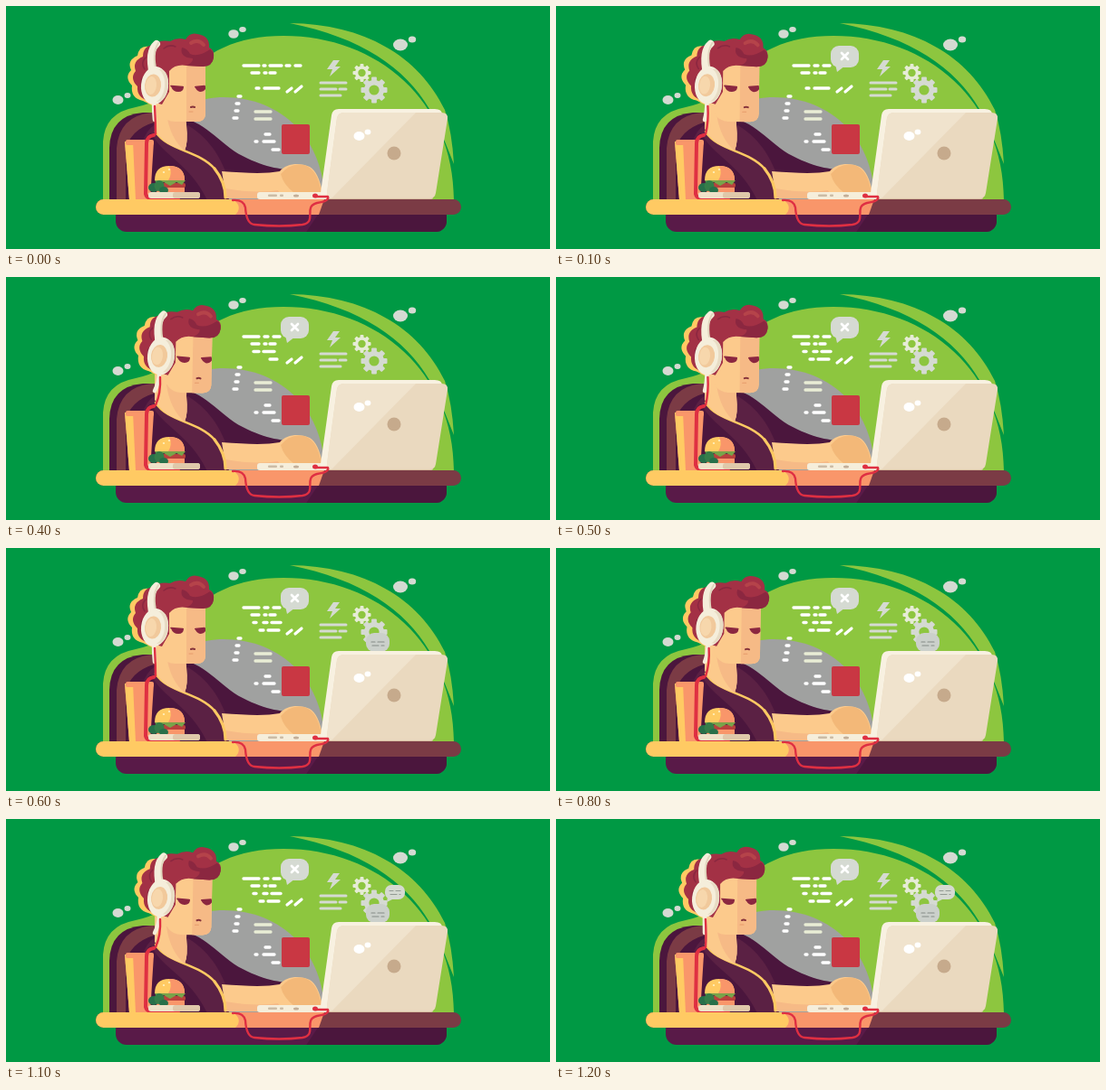
An HTML page with a canvas for the animation above (1.3 s loop, 600x269 px).

```html
<!DOCTYPE html>
<html lang="en">
<head>
<meta charset="utf-8">
<title>Coder at a desk</title>
<style>
html, body { margin: 0; width: 100%; height: 100%; overflow: hidden; background: #009944; }
canvas { display: block; width: 600px; height: 269px; }
</style>
</head>
<body>
<canvas id="stage"></canvas>
<script>
const W = 600, H = 269, LOOP = 1300, STEP = 100;
const canvas = document.getElementById('stage');
const ctx = canvas.getContext('2d');
const ratio = window.devicePixelRatio || 1;
canvas.width = W * ratio;
canvas.height = H * ratio;

const C = {
  bg: '#009944', lime: '#8dc63f', gray: '#a0a1a0', pale: '#d5dad2',
  plum: '#4b163d', shirt: '#5b2144', brown: '#7b3b45',
  hair: '#a33145', hairDark: '#8b2740', hairLight: '#b5434a',
  skin: '#fcca8c', skinShade: '#f6ba86', gold: '#ffca63', salmon: '#f9966a',
  cream: '#f5eedb', beige: '#ead9bf', red: '#df2f42', white: '#ffffff'
};

function shape(d, fill) {
  ctx.fillStyle = fill;
  ctx.fill(new Path2D(d));
}

function stroke(d, color, width) {
  ctx.strokeStyle = color;
  ctx.lineWidth = width;
  ctx.lineCap = ctx.lineJoin = 'round';
  ctx.stroke(new Path2D(d));
}

function oval(x, y, rx, ry, fill, turn = 0) {
  ctx.fillStyle = fill;
  ctx.beginPath();
  ctx.ellipse(x, y, rx, ry, turn, 0, Math.PI * 2);
  ctx.fill();
}

function box(x, y, w, h, r, fill) {
  ctx.fillStyle = fill;
  ctx.beginPath();
  ctx.roundRect(x, y, w, h, r);
  ctx.fill();
}

// Rounded bar with further shapes painted inside it
function bar(x, y, w, h, r, fill, paint) {
  ctx.save();
  box(x, y, w, h, r, fill);
  ctx.clip();
  paint();
  ctx.restore();
}

// Horizontal dashes given as [start, end] pairs
function dashes(y, spans, color = C.white, width = 3.3) {
  for (const [a, b] of spans) stroke(`M${a} ${y}H${b}`, color, width);
}

function gear(x, y, r, hole, color) {
  ctx.save();
  ctx.translate(x, y);
  for (let i = 0; i < 8; i++) {
    ctx.rotate(Math.PI / 4);
    box(-r * 0.2, -r, r * 0.4, r * 0.5, 1, color);
  }
  ctx.beginPath();
  ctx.arc(0, 0, (r * 0.76 + hole) / 2, 0, Math.PI * 2);
  ctx.strokeStyle = color;
  ctx.lineWidth = r * 0.76 - hole;
  ctx.stroke();
  ctx.restore();
}

function backdrop() {
  ctx.fillStyle = C.bg;
  ctx.fillRect(0, 0, W, H);
  shape('M107 215L107 150Q109 118 143 112Q175 105 190 85C220 50 255 33 306 33C410 33 494 105 494 215Z', C.lime);
  shape('M313 19C395 20 455 55 484 115Q492 140 494 175L480 140L467 114C440 68 392 35 313 19Z', C.lime);
  shape('M150 215C150 140 190 101 240 101C305 101 351 149 351 215Z', C.gray);

  oval(251, 31, 5.7, 4.8, C.pale);
  oval(261, 26, 3.8, 3, C.pale);
  oval(435, 43, 8, 6.5, C.pale);
  oval(448, 37, 4.2, 3.5, C.pale);
  oval(123.5, 104, 6, 5, C.pale);
  oval(134, 99, 3.5, 3, C.pale);

  shape('M361 60L368 60L363 67H369L357 78L360 70H354Z', C.pale);
  dashes(85, [[347, 375]], C.pale, 3);
  dashes(92, [[347, 364], [368, 375]], C.pale, 3);
  dashes(99, [[347, 369]], C.pale, 3);
  gear(392.5, 74, 10, 4.2, '#e6ecd6');
  gear(406, 93, 14.5, 5.6, C.pale);
}

function codeLines(k) {
  dashes(66, k < 1 ? [[262, 279], [284, 286], [291, 304], [309, 313], [319, 325]]
                   : [[262, 279], [285, 289], [295, 302]]);
  dashes(74, [[271, 279], [285, 287], [291, 297]]);
  if (k > 2) dashes(82.5, k < 5 ? [[273, 279], [284, 296]] : [[273, 276], [284, 288], [293, 303]]);
  if (k < 3) dashes(91, [[276, 279], [285, 301]]);
  else dashes(91, k < 5 ? [[291, 299]] : [[280, 284], [289, 301]]);
  stroke('M310 95L315 91M319 95L326 89', C.white, 3.2);

  dashes(100, [[256, 259]]);
  dashes(108, [[254, 257]]);
  dashes(116, [[253, 256]]);
  dashes(124, [[251, 255]]);
  dashes(117, [[275, 292]], '#e9edd5');
  dashes(125, [[275, 292]], '#e9edd5');
  dashes(142, [[286, 291]]);
  dashes(150, [[275, 277], [284, 296]]);
  dashes(159, [[294, 301]]);
  box(304, 131, 31, 33, 2, '#c93743');
}

function bubbles(k) {
  if (k >= 1) {
    box(303, 44, 31, 24, 9, C.pale);
    shape('M308 64L310 73L319 66Z', C.pale);
    stroke('M315 52L322 59M322 52L315 59', C.white, 2.7);
  }
  if (k >= 6) {
    box(397, 94, 26, 21, 9, '#cbd0cb');
    shape('M402 112L406 118L413 113Z', '#cbd0cb');
    dashes(104, [[403, 407], [410, 417]], '#858c88', 1.2);
    dashes(108, [[404, 411], [414, 417]], '#858c88', 1.2);
  }
  if (k >= 10) {
    box(418, 73, 22, 16, 7, C.pale);
    shape('M421 86L420 92L428 88Z', C.pale);
    dashes(79.5, [[423, 427], [430, 435]], '#929a93', 1.1);
    dashes(83.5, [[424, 431], [434, 435]], '#929a93', 1.1);
  }
}

function body() {
  shape('M114 215L114 157Q115 121 151 118H176V215Z', C.plum);
  shape('M122 215V157Q125 122 160 118H180V215Z', C.brown);
  shape('M132 215V163Q134 137 166 128H180V215Z', C.plum);
  // Far sleeve, then the near side of the shirt
  shape('M186 124C216 122 234 152 261 166C288 180 305 181 325 182L300 205H214Z', C.plum);
  shape('M150 215V154Q153 138 166 130L197 130C221 143 234 163 242 183L246 215Z', C.shirt);
  shape('M151 158Q151 145 160 140C172 166 202 173 222 215H151Z', C.plum);
  stroke('M165 139C178 160 213 160 230 180', C.gold, 2.5);
}

function neck(dx) {
  const right = 197 + dx * 0.5;
  shape(`M164 101H${right}L199 132Q201 152 197 160Q173 154 164 136Z`, C.skin);
  shape(`M177 119L${right} 121L199 132Q201 152 197 160Q181 147 177 119Z`, C.skinShade);
}

function arm() {
  shape('M238 183C265 185 286 186 302 183C309 174 324 173 335 178Q345 184 349 207H242Z', C.skin);
  shape('M303 186Q313 173 329 176Q344 181 348 207H318Q306 198 303 186Z', '#f3b878');
  shape('M242 202Q275 208 300 204L305 213H243Z', C.skinShade);
  stroke('M230 180Q242 195 242 212', C.gold, 3.2);
}

function snack() {
  shape('M131 150H163L159 215H136Z', C.salmon);
  shape('M131 150H140L143 215H136Z', C.gold);
  box(132, 148, 31, 6, 2, C.salmon);
  stroke('M163 143Q155 144 155 152L154 208Q155 213 161 213H190', C.red, 4);

  box(166, 199, 31, 9, 3, C.salmon);
  box(165, 196, 33, 5, 2, '#b9413d');
  shape('M164 193H198L194 198L188 195L181 199L174 195L167 198Z', '#79a34a');
  shape('M164 193Q164 177 180 177Q197 177 197 193Z', C.gold);
  shape('M180 177Q197 177 197 193H179Q184 185 180 177Z', C.salmon);
  oval(174, 184, 1.2, 0.9, '#fff0bd');
  oval(180, 181, 1.2, 0.9, '#fff0bd');
  oval(163, 201, 6, 5, '#28704a');
  oval(169, 199, 5.5, 6, '#367d49');
  oval(174, 204, 5, 4, '#28704a');
  box(157, 206, 57, 7, 3, '#eee1c8');
  box(184, 206, 30, 7, 3, '#dfc8aa');
}

function desk() {
  bar(121, 222, 365, 28, 12, '#591a48', () => shape('M350 222H490V252H330Z', C.plum));
  bar(99, 214, 403, 17, 8.5, C.brown, () => {
    shape('M240 214H351L345 231H240Z', C.salmon);
    shape('M99 214H250Q262 222 253 231H99Z', C.gold);
  });
}

function laptop() {
  box(277, 206, 84, 8, 3, C.cream);
  box(289, 208.5, 10, 2.5, 1, '#cbbca6');
  box(302, 208.5, 4, 2.5, 1, '#cbbca6');
  oval(320, 210, 3, 1.5, '#c2ae98');
  box(355, 207, 116, 7, 2, '#d9c0a4');
  shape('M367 114H473Q481 114 481 120L468 207Q467 212 461 212H352Q346 212 347 207L359 121Q360 114 367 114Z', '#f8f1e1');
  shape('M373 118H480Q488 118 487 125L474 207Q473 213 467 213H359Q353 213 354 207L365 124Q366 118 373 118Z', C.beige);
  shape('M373 118H452L359 213Q353 213 354 207L365 124Q366 118 373 118Z', '#f0e3cd');
  oval(428, 163, 7.5, 7.5, '#c6aa8c');
  oval(389.5, 144, 6, 5, C.white);
  oval(399, 139.5, 3.4, 3, C.white);
  stroke('M250 215Q262 214 264 223Q265 241 274 242Q302 245 327 242C344 239 327 222 343 218Q357 216 355 211H341', C.red, 2.4);
  oval(341, 210, 3, 2.5, C.red);
}

// sway: 0 leans back, 1 leans forward
function head(sway) {
  ctx.save();
  ctx.translate(190 + sway * 7, 90);
  ctx.rotate(sway * 0.02);
  ctx.translate(-190, -90);

  shape('M158 45Q147 43 145 55Q133 60 138 71Q130 79 139 88Q137 102 151 105L163 111L170 65Z', C.gold);
  shape('M174 64H220V119Q220 128 210 128H186Q169 127 168 106Z', C.skin);
  shape('M199 66H220V119Q220 128 210 128H199Z', C.skinShade);

  shape('M163 43Q151 44 151 56Q139 61 143 72Q136 80 145 89Q144 101 157 105L172 109L180 95V72Q187 64 199 66L217 67Q228 65 229 57Q230 48 224 46Q225 33 211 31Q203 29 198 37Q189 34 181 39Q169 37 163 43Z', C.hair);
  shape('M194 46Q200 47 203 53Q212 57 225 48Q230 51 229 57Q228 67 217 67L199 66Q207 62 206 58Q191 57 194 46Z', C.hairDark);
  stroke('M204 41Q212 36 218 43', C.hairLight, 4);
  stroke('M174 47Q180 42 187 45M154 57Q148 63 153 70M150 80Q148 86 152 91', C.hairDark, 1.5);

  shape('M182 89H196Q196 95 190 95Q184 95 182 89Z', C.hairDark);
  shape('M208 89H220V92Q218 95 214 95Q210 94 208 89Z', C.hairDark);
  stroke('M182 88.5L195 89.5M209 89.5L219 88.5', C.hairDark, 1.7);
  stroke('M204 112Q206 111 208 112', '#86333b', 2);
  stroke('M202 117H206', '#e69a6b', 1);

  stroke('M166 42C158 49 159 63 162 76', C.cream, 8);
  stroke('M168 41C162 50 163 61 166 73', '#e1d6be', 2);
  oval(164, 88, 15, 21, C.cream, 0.1);
  oval(169, 88, 10, 18, '#e8dcc4', 0.1);
  oval(163, 88, 12, 19, C.cream, 0.1);
  oval(162, 88, 9, 12.5, '#f1c99b', 0.1);
  oval(160, 88, 6, 10, '#f7d7ac', 0.1);
  ctx.restore();
}

function cable(sway) {
  const x = 163 + sway * 6;
  stroke(`M${x} 105Q${x} 117 164 126`, C.cream, 4.5);
  stroke(`M${x + 1} 111Q${x + 2} 128 165 142L160 144`, C.red, 2.4);
}

// Two leans: the second one holds forward longer and returns quicker
function swayAt(k) {
  if (k <= 6) return Math.min(1, 1.15 * Math.sin(Math.PI * k / 6));
  if (k <= 10) return Math.sin(Math.PI / 2 * (k - 6) / 4 + 0.1);
  return k < 12 ? 1 : 0.15;
}

function draw(now) {
  const k = Math.floor((now % LOOP) / STEP);
  const sway = Math.max(0, swayAt(k));
  ctx.setTransform(ratio, 0, 0, ratio, 0, 0);
  backdrop();
  codeLines(k);
  bubbles(k);
  body();
  neck(sway * 5);
  head(sway);
  cable(sway);
  arm();
  snack();
  desk();
  laptop();
}

const start = performance.now();
function tick() {
  draw(performance.now() - start);
  requestAnimationFrame(tick);
}
tick();
</script>
</body>
</html>
```
